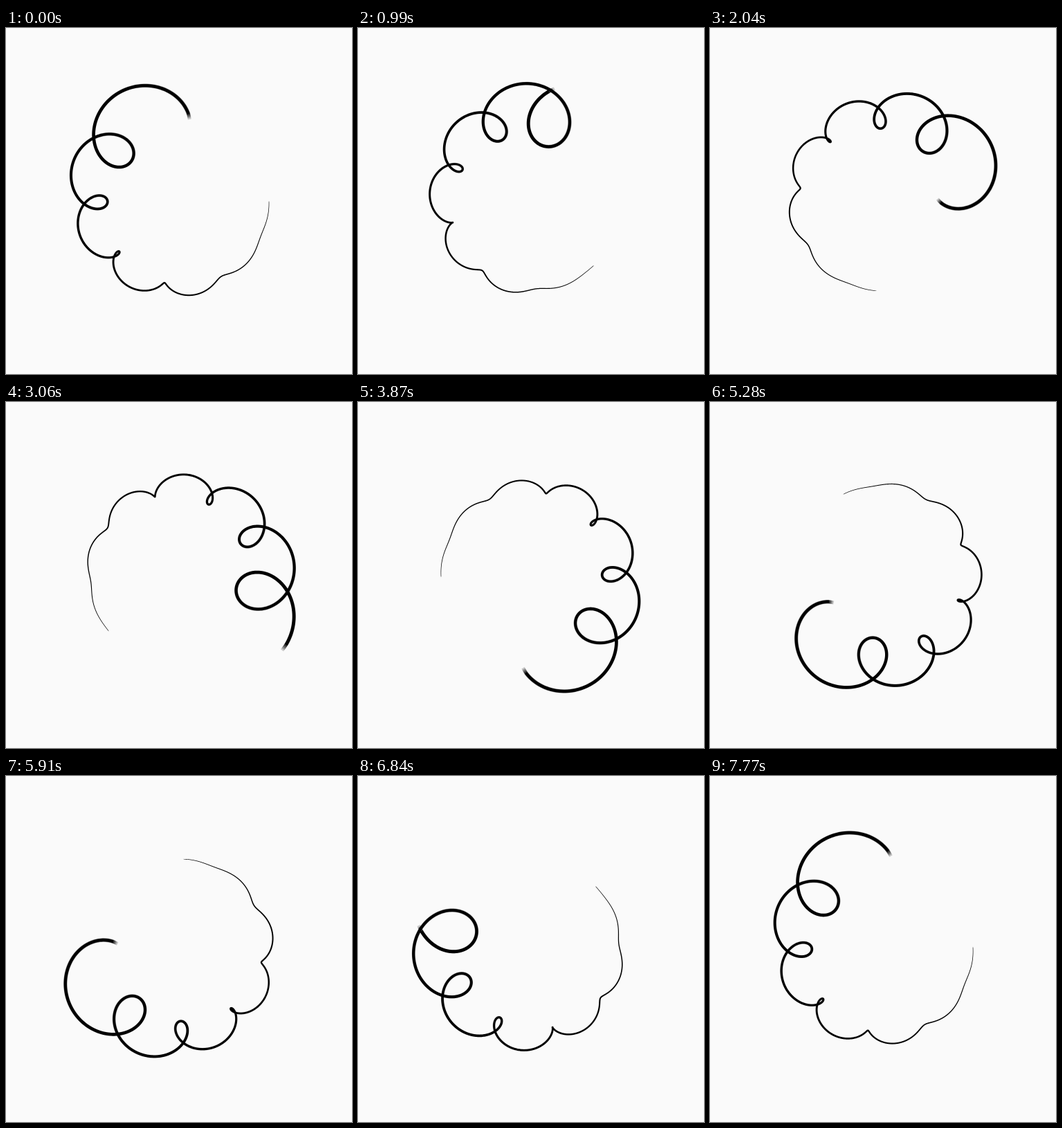
These frames come from a looping animation (500x500 px, 7.8 s). An HTML page with a canvas:

```html
<!DOCTYPE html>
<html lang="en">
<head>
<meta charset="utf-8">
<title>Curling line</title>
<style>
  html, body { margin: 0; width: 100%; height: 100%; overflow: hidden; background: #fafafa; }
  canvas { display: block; width: 500px; height: 500px; }
</style>
</head>
<body>
<canvas id="stage" width="500" height="500"></canvas>
<script>
const ctx = document.getElementById('stage').getContext('2d');
const TAU = Math.PI * 2;
const LOOP = 7800, STEP = 30, STEPS = LOOP / STEP;
const CENTER = 250, ORBIT = 130, CURL = 55;
const SPAN = 0.7 * TAU;
const POINTS = 1000;
const SAMPLES = 5, SHUTTER = 0.6;

const curlRadius = q => CURL * (8 ** q - 1) / 7;
const lineWidth = q => 0.6 + 4.4 * q;

// q runs from the tail (0) to the head (1); turn is the loop progress.
function pointAt(q, turn) {
  const orbit = TAU * turn + SPAN * q;
  const curl = 13 * TAU * turn + 10 * SPAN * q;
  const r = curlRadius(q);
  return [
    CENTER + ORBIT * Math.cos(orbit) + r * Math.cos(curl),
    CENTER + ORBIT * Math.sin(orbit) + r * Math.sin(curl)
  ];
}

// A single filled outline gives the line its growing width.
function fillRibbon(turn) {
  const points = Array.from({ length: POINTS }, (_, i) => pointAt(i / POINTS, turn));
  const left = [], right = [];
  points.forEach(([x, y], i) => {
    const [ax, ay] = points[Math.max(i - 1, 0)];
    const [bx, by] = points[Math.min(i + 1, POINTS - 1)];
    const scale = lineWidth(i / POINTS) / 2 / (Math.hypot(bx - ax, by - ay) || 1);
    const nx = (ay - by) * scale, ny = (bx - ax) * scale;
    left.push([x + nx, y + ny]);
    right.push([x - nx, y - ny]);
  });
  ctx.beginPath();
  for (const [x, y] of left.concat(right.reverse())) ctx.lineTo(x, y);
  ctx.fill();
}

// Motion blur: average several moments within one step.
function draw(step) {
  ctx.clearRect(0, 0, 500, 500);
  ctx.globalCompositeOperation = 'lighter';
  ctx.fillStyle = `rgba(0, 0, 0, ${1 / SAMPLES})`;
  for (let s = 0; s < SAMPLES; s++) {
    fillRibbon((step + SHUTTER * s / SAMPLES) / STEPS);
  }
}

const start = performance.now();
let shown = -1;

function tick() {
  const step = Math.floor((performance.now() - start) / STEP) % STEPS;
  if (step !== shown) draw(shown = step);
  requestAnimationFrame(tick);
}
tick();
</script>
</body>
</html>
```
